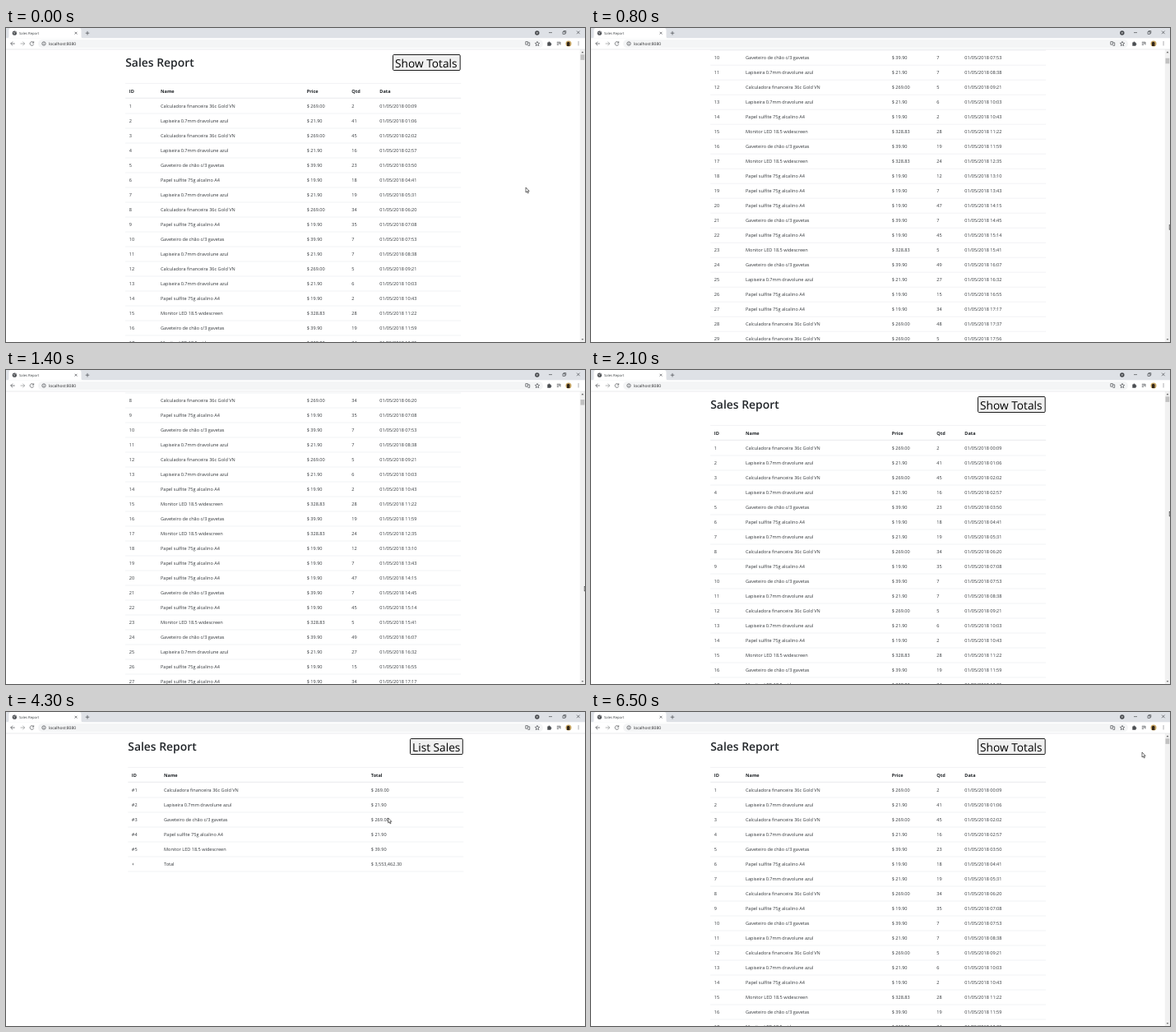
Recreate the animation shown at these times as an HTML page. Size 704 px wide and 382 px high, loop 6600 ms.

```html
<!DOCTYPE html>
<html lang="en">
<head>
<meta charset="utf-8">
<title>Sales Report</title>
<style>
  html, body { margin: 0; width: 100%; height: 100%; overflow: hidden; background: #fff; }
  svg { display: block; width: 704px; height: 382px; }
  text { font: 5.57px "Open Sans", "Noto Sans", sans-serif; fill: #34383c; text-rendering: geometricPrecision; white-space: pre; }
  .head { font-weight: 700; fill: #212529; }
  .title { font-size: 13.9px; font-weight: 600; fill: #212529; }
  .label { font-size: 13.7px; fill: #000; }
  .tab { font-size: 4.2px; fill: #3c4043; }
  .url { font-size: 4.9px; fill: #202124; }
  .line { stroke: #e2e5e8; }
  .button { fill: #f0f0f0; stroke: #1c1c1c; }
  .icon { fill: none; stroke: #4a4d51; stroke-width: .7; }
  .dark { fill: #4a4d51; }
</style>
</head>
<body>
<svg viewBox="0 0 704 382">
  <defs><clipPath id="page"><rect y="26" width="704" height="356"/></clipPath></defs>
  <rect width="704" height="382" fill="#fff"/>
  <g clip-path="url(#page)">
    <g id="sales"></g>
    <g id="totals"></g>
    <g id="bar">
      <rect x="697.8" y="26" width="6.2" height="356" fill="#f1f1f1"/>
      <path d="M699.6 30.2l1.4-1.6 1.4 1.6z" fill="#505050"/>
      <path d="M699.6 378.2l1.4 1.6 1.4-1.6z" fill="#505050"/>
      <rect id="thumb" x="698.5" y="32.3" width="4.8" height="6.6" fill="#c1c1c1"/>
    </g>
  </g>

  <g id="browser">
    <rect width="704" height="12.5" fill="#dee1e6"/>
    <path d="M1 12.5Q3.5 12.5 3.5 10V3Q3.5 0 6 0H89Q91.5 0 91.5 3V10Q91.5 12.5 94 12.5z" fill="#fff"/>
    <circle class="dark" cx="10.4" cy="6.2" r="2.6"/>
    <path d="M8.8 5.4l1.6.5-.5 1.6M11 4.2l1 1.3" fill="none" stroke="#fff" stroke-width=".6"/>
    <text class="tab" x="16" y="7.8">Sales Report</text>
    <path class="icon" d="M83.6 4.8l2.8 2.8m0-2.8l-2.8 2.8M96.7 6.2h4.6M99 3.9v4.6"/>
    <circle class="dark" cx="645.8" cy="6" r="2.7"/>
    <path d="M644.6 5.4h2.4l-1.2 1.5z" fill="#fff"/>
    <path class="icon" d="M660 5.6h4M677 4.6h2.8v2.8H677zM678 4.5V3.5h2.8v2.8h-.9M694 3.6l3.6 3.6m0-3.6l-3.6 3.6"/>
    <rect y="12.5" width="704" height="13.5" fill="#fff"/>
    <rect x="39" y="14" width="614" height="10.2" rx="5.1" fill="#f4f5f6"/>
    <path class="icon" d="M10.8 19H5.7m2.4-2.4L5.7 19l2.4 2.4"/>
    <path class="icon" d="M17.6 19h5.1m-2.4-2.4l2.4 2.4-2.4 2.4" stroke-opacity=".6"/>
    <path class="icon" d="M33.3 17.6a2.3 2.3 0 1 0 .4 2M33.7 16.3v1.8h-1.8"/>
    <circle class="icon" cx="46" cy="19" r="2.2"/>
    <path class="icon" d="M46 18.7v1.5M46 17.4v.6"/>
    <text class="url" x="52" y="20.8">localhost:8080</text>
    <path class="icon" d="M631.8 16.6h2.6v3.6h-2.6zM634.8 17.8h1.9v3.6h-2.2" stroke-width=".6"/>
    <path class="icon" d="M646 16.4l.8 1.8 1.9.2-1.4 1.3.4 1.9-1.7-1-1.7 1 .4-1.9-1.4-1.3 1.9-.2z" stroke-width=".6"/>
    <path class="dark" d="M658.3 17.4h1.2a.9.9 0 0 1 1.8 0h1.2v1.3a.9.9 0 0 1 0 1.8v1.2h-4.2z"/>
    <path class="icon" d="M669.8 17.2h4M669.8 18.8h4M669.8 20.4h2.2M674 17v3.5"/>
    <circle cx="684" cy="19" r="3.5" fill="#c9a765"/>
    <path d="M682 22v-2.4a1.9 2 0 1 1 3.4 0V22z" fill="#33271a"/>
    <path class="dark" d="M695.6 16.6h.9v.9h-.9zM695.6 18.5h.9v.9h-.9zM695.6 20.4h.9v.9h-.9z"/>
    <path d="M0 26h704" stroke="#dcdee1" stroke-width=".6"/>
  </g>
  <path id="cursor" d="M0 0v6l1.4-1.2 1 2.2 1-.5-1-2.1h1.8z" fill="#fff" stroke="#111" stroke-width=".6"/>
</svg>

<script>
const LOOP = 6600, STEP = 100, ROW = 18, NOTCH = 36.8;
const $ = id => document.getElementById(id);

const products = {
  C: ['Calculadora financeira 36c Gold VN', '$ 269.00'],
  L: ['Lapiseira 0.7mm dravolune azul', '$ 21.90'],
  G: ['Gaveteiro de chão c/3 gavetas', '$ 39.90'],
  P: ['Papel sulfite 75g alcalino A4', '$ 19.90'],
  M: ['Monitor LED 18.5 widescreen', '$ 328.83']
};

let seed = 29;
const random = () => (seed = seed * 16807 % 2147483647) / 2147483647;
const pad = n => String(n).padStart(2, '0');

// sales come a little closer together as the day goes on
function saleTime(i) {
  const minutes = Math.round(9 + 58 * i - .71 * i * i);
  return `01/05/2018 ${pad(Math.floor(minutes / 60))}:${pad(minutes % 60)}`;
}

const sales = [...'CLCLGPLCPGLCLPMGMPPPGPMGLPPCC'].map((key, i) =>
  [i + 1, ...products[key], 2 + Math.floor(random() * 48), saleTime(i)]);

const totals = [...'CLGPM'].map((key, i) => ['#' + (i + 1), products[key][0], sales[i][2]]);
totals.push(['+', 'Total', '$ 3,553,462.30']);

const text = (x, y, str, cls = '') => `<text class="${cls}" x="${x}" y="${y}">${str}</text>`;
const line = (x, y, w = .5) => `<path class="line" d="M${x} ${y}h408" stroke-width="${w}"/>`;
const cells = (cols, row, y, cls) => row.map((s, i) => text(cols[i], y, s, cls)).join('');

function view(left, button, buttonX, cols, heads, rows) {
  const width = left + 407 - buttonX;
  return text(left, 46.6, 'Sales Report', 'title') +
    `<rect class="button" x="${buttonX}" y="32.5" width="${width}" height="19" rx="1.2"/>` +
    text(buttonX + 2.6, 47.6, button, 'label') +
    line(left, 67.4) + cells(cols, heads, 78.6, 'head') + line(left, 85.3, .8) +
    rows.map((row, i) => cells(cols, row, 97 + i * ROW) + line(left, 104 + i * ROW)).join('');
}

$('sales').innerHTML = view(145.2, 'Show Totals', 470.5, [149.8, 188, 365.7, 420.3, 454.3],
  ['ID', 'Name', 'Price', 'Qtd', 'Data'], sales);
$('totals').innerHTML = view(148.3, 'List Sales', 491.5, [152.8, 192, 443.8],
  ['ID', 'Name', 'Total'], totals);

// eased progress from 0 to 1 between two times
function glide(t, start, end) {
  const u = Math.min(1, Math.max(0, (t - start) / (end - start)));
  return u * u * (3 - 2 * u);
}

const scrollAt = t =>
  NOTCH * (6 * glide(t, 200, 800) - glide(t, 1200, 1400) - 5 * glide(t, 1400, 1900));

// pointer moves: start, end, x, y
const moves = [
  [0, 700, 703.3, 238], [700, 1400, 703.3, 263], [1400, 2100, 703.3, 172],
  [2100, 2800, 514, 40], [3100, 3500, 525, 42], [4000, 4400, 453.5, 145],
  [4500, 5300, 531, 45.5], [5400, 6500, 670, 49]
];

const pointerAt = t => moves.reduce(([x, y], [start, end, toX, toY]) => {
  const k = glide(t, start, end);
  return [x + (toX - x) * k, y + (toY - y) * k];
}, [632, 194]);

const shift = (id, x, y) => $(id).setAttribute('transform', `translate(${x} ${y})`);
const show = (id, on) => $(id).style.display = on ? '' : 'none';

function draw(now) {
  const t = Math.floor((now % LOOP + .5) / STEP) * STEP % LOOP;
  const scroll = scrollAt(t), summed = t >= 3000 && t < 5500;
  shift('cursor', ...pointerAt(t));
  shift('sales', 0, -scroll);
  shift('thumb', 0, scroll * .02);
  show('sales', !summed);
  show('bar', !summed);
  show('totals', summed);
  requestAnimationFrame(draw);
}
draw(performance.now());
</script>
</body>
</html>
```
